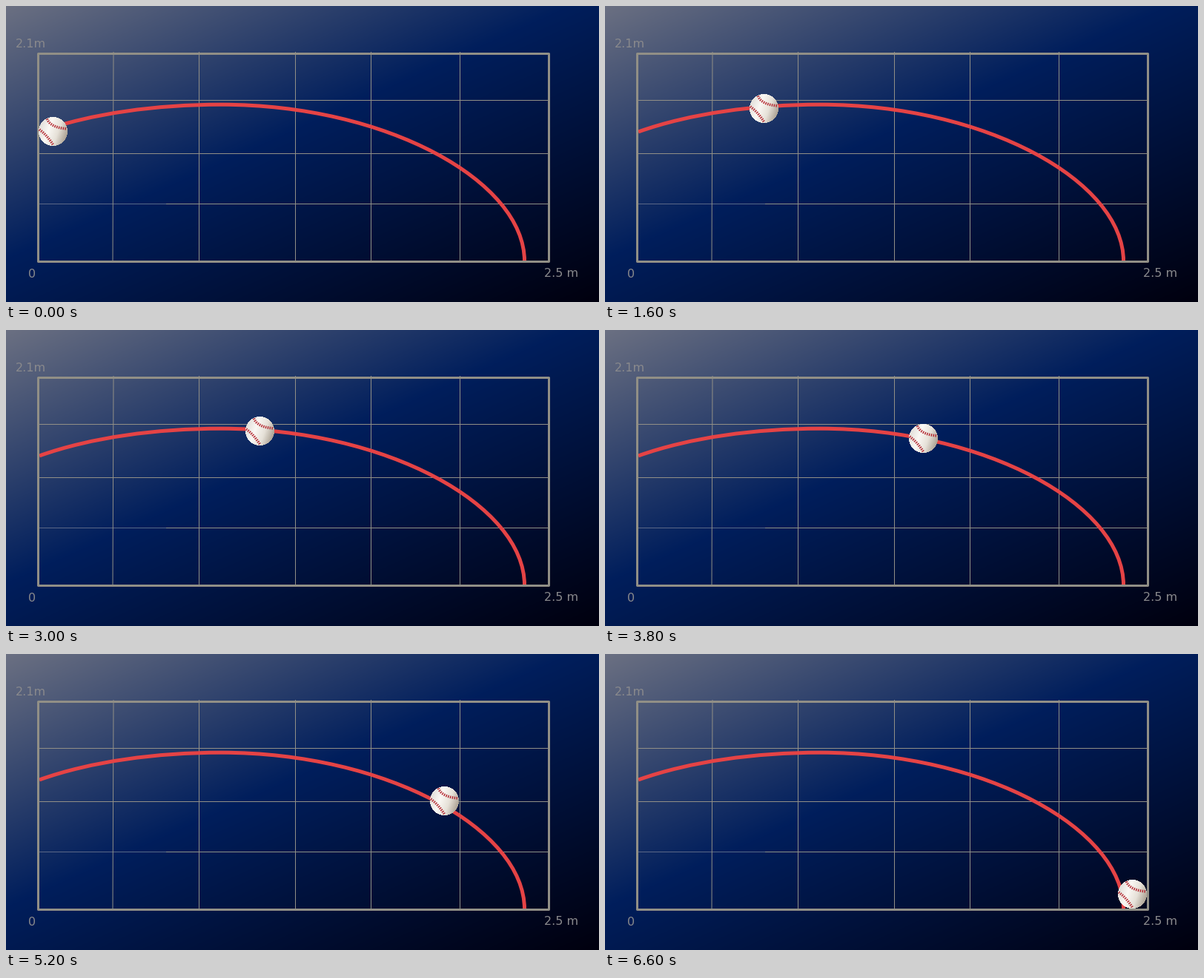
Recreate the animation shown at these times as a matplotlib script. Size 800 by 400 pixels, loop 7300 ms.

```python
import numpy as np
import matplotlib.pyplot as plt
from matplotlib.animation import FuncAnimation
from matplotlib.colors import LinearSegmentedColormap
from matplotlib.patches import PathPatch, Rectangle
from matplotlib.path import Path

W, H, DPI = 800, 400, 100
INTERVAL, FRAMES = 100, 73
FRAMES_PER_STEP, LAST_STEP = 2, 33
PX = 72 / DPI
BALL = 39
SLANT = 0.45
GRID = "#918f86"

# Ball keyframes: step, centre x, centre y
KEYS = np.array([(0, 64, 169.5), (5, 158, 146.5), (11, 271, 135.5),
                 (15, 342.5, 136.5), (19, 430, 146.5),
                 (26, 591, 198.5), (33, 712, 324.5)])
STEPS, POINTS = KEYS[:, 0], KEYS[:, 1:]
SLOPES = np.gradient(POINTS, STEPS, axis=0, edge_order=2)


def ball_centre(step):
    """Smooth Hermite path through the keyframes."""
    i = min(np.searchsorted(STEPS, step, side="right"), len(STEPS) - 1) - 1
    span = STEPS[i + 1] - STEPS[i]
    t = (step - STEPS[i]) / span
    ease = t * t * (3 - 2 * t)
    return (POINTS[i] * (1 - ease) + POINTS[i + 1] * ease
            + span * t * (1 - t) * ((1 - t) * SLOPES[i] - t * SLOPES[i + 1]))


def background():
    y, x = np.mgrid[0:H, 0:W] + 0.5
    cmap = LinearSegmentedColormap.from_list(
        "sky", [(0, "#6b7082"), (0.45, "#001e5c"), (1, "#00000e")], N=1024)
    return cmap((x * SLANT + y) / (W * SLANT + H))


def ball_image():
    """Shaded sphere with a hard pixel edge."""
    y, x = (np.mgrid[0:BALL, 0:BALL] + 0.5) / BALL * 2 - 1
    cmap = LinearSegmentedColormap.from_list(
        "leather", ["#e2dfda", "#faf8f4", "#e6e1d8", "#aca294"])
    image = cmap((x * 0.85 + y * 0.3 + 0.9) / 1.8)
    image[..., 3] = x**2 + y**2 <= 1
    return image


def quad(p0, p1, p2):
    t = np.linspace(0, 1, 30)[:, None]
    a, b, c = map(np.array, (p0, p1, p2))
    return (1 - t)**2 * a + 2 * t * (1 - t) * b + t**2 * c


fig = plt.figure(figsize=(W / DPI, H / DPI), dpi=DPI)
ax = fig.add_axes([0, 0, 1, 1])
ax.axis("off")
ax.imshow(background(), extent=(0, W, H, 0), aspect="auto", zorder=0)


def line(x0, y0, x1, y1, color=GRID):
    ax.plot([x0, x1], [y0, y1], color=color, lw=PX, zorder=1,
            solid_capstyle="butt", snap=False)


for y in (127.5, 199.5):
    line(43, y, 733, y)
line(43, 267.5, 216, 267.5, "#5a6787")
line(216, 267.5, 733, 267.5)
line(145, 62, 144, 346)
for x in (260.5, 390.5, 492.5, 612.5):
    line(x, 62, x, 346)

ax.add_patch(Rectangle((43.5, 64.5), 689, 281, fill=False, ec=GRID,
                       lw=3 * PX, zorder=3, joinstyle="round", snap=False))

trajectory = Path([(45, 170), (115, 145), (203, 133.2), (290, 133.2),
                   (514, 133.2), (699.5, 237), (699.5, 345)],
                  [Path.MOVETO] + [Path.CURVE4] * 6)
ax.add_patch(PathPatch(trajectory, fill=False, ec="#e54345", lw=5 * PX,
                       capstyle="butt", zorder=2))

for x, y, label in ((13, 56, "2.1m"), (30, 367, "0"), (726, 366, "2.5 m")):
    ax.text(x, y, label, family="DejaVu Sans", size=16 * PX,
            color="#89898c", va="baseline", zorder=4)

ball = ax.imshow(ball_image(), interpolation="nearest", aspect="auto", zorder=5)
seams = [quad((-8, -17), (-4, -5.5), (18.5, -3.5)),
         quad((-18.5, -2.5), (-9, 4), (0, 18))]
stitches = [ax.plot([], [], color="#b4262f", lw=3.6 * PX, zorder=6,
                    dashes=(0.4, 0.4), dash_capstyle="butt")[0]
            for _ in seams]
ax.set_xlim(0, W)
ax.set_ylim(H, 0)


def update(frame):
    step = min(frame // FRAMES_PER_STEP, LAST_STEP)
    left, top = np.round(ball_centre(step) - BALL / 2)
    ball.set_extent((left, left + BALL, top + BALL, top))
    ax.set_xlim(0, W)
    ax.set_ylim(H, 0)
    for seam, stitch in zip(seams, stitches):
        stitch.set_data(*(seam + (left + BALL / 2, top + BALL / 2)).T)
    return [ball, *stitches]


anim = FuncAnimation(fig, update, frames=FRAMES, interval=INTERVAL,
                     repeat=True, repeat_delay=0, blit=False)
plt.show()
```
